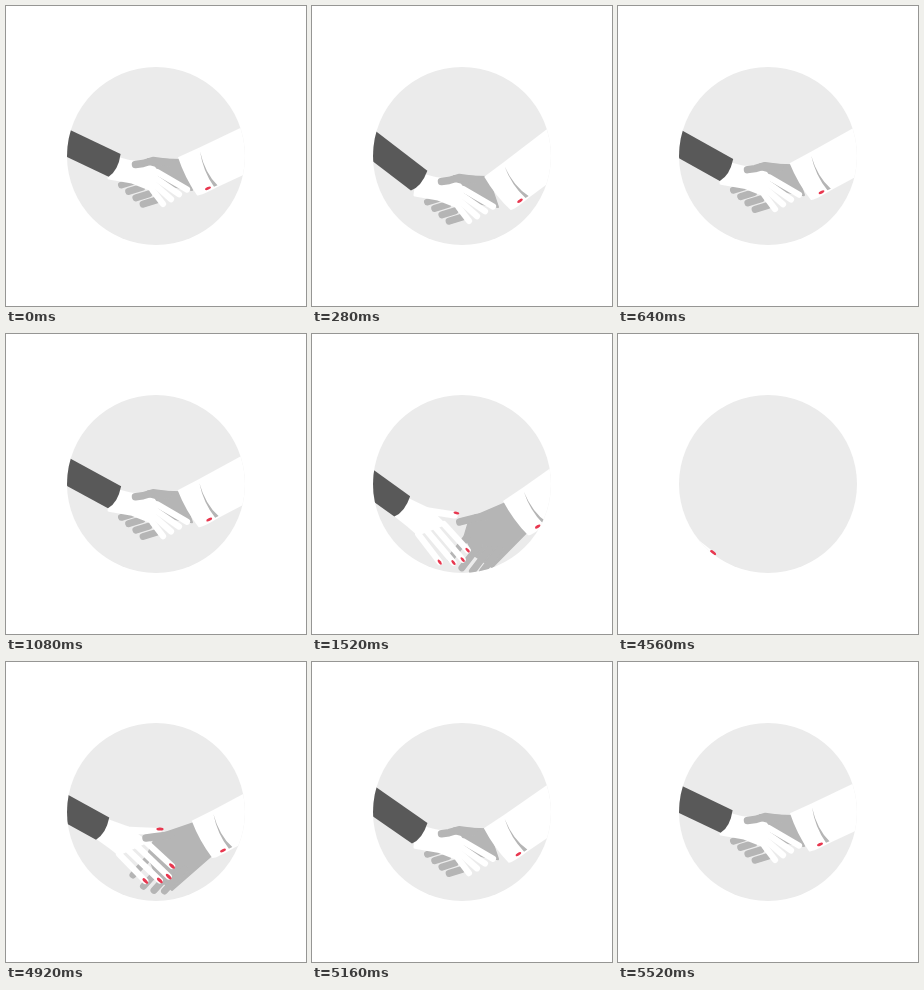
These frames come from a looping animation (300x300 px, 5.56 s). An HTML page:

```html
<!DOCTYPE html>
<html lang="en">
<head>
<meta charset="utf-8">
<title>Handshake</title>
<style>
  html, body { margin: 0; width: 100%; height: 100%; overflow: hidden; background: #fff; }
  svg { display: block; width: 100%; height: 100%; }
</style>
</head>
<body>
<svg viewBox="0 0 300 300">
  <clipPath id="disc"><circle cx="150" cy="150" r="89"/></clipPath>
  <circle cx="150" cy="150" r="89" fill="#ebebeb"/>
  <g id="scene" clip-path="url(#disc)"></g>
</svg>
<script>
const LOOP = 5560, GONE = 1960, BACK = 4560;
const WHITE = '#fff', GREY = '#b5b5b5', DARK = '#595959', RED = '#e8374f';
const LEFT = 1, RIGHT = -1;
const scene = document.getElementById('scene');
const parts = [], layers = [];

const lerp = (a, b, k) => a + (b - a) * k;
const mix = (p, q, k) => p.map((v, i) => lerp(v, q[i], k));
const clamp = v => Math.max(0, Math.min(1, v));
const smooth = u => (1 - Math.cos(Math.PI * clamp(u))) / 2;
const easeOut = u => 1 - (1 - u) ** 3;

function node(tag, attrs, parent) {
  const el = document.createElementNS('http://www.w3.org/2000/svg', tag);
  set(el, attrs);
  return parent.appendChild(el);
}

function set(el, attrs) {
  for (const name in attrs) el.setAttribute(name, attrs[name]);
}

function layer(side, isHand) {
  const g = node('g', { 'stroke-linecap': 'round', 'stroke-linejoin': 'round' }, scene);
  layers.push({ g, side, isHand });
  return g;
}

// Parts blend from a clasped pose (k = 0) to an open pose (k = 1).
function outline(g, color, clasped, open, width, filled) {
  const el = node('path', { fill: filled ? color : 'none', stroke: color, 'stroke-width': width }, g);
  parts.push(k => set(el, { d: 'M' + clasped.map((p, i) => mix(p, open[i], k)).join('L') + (filled ? 'Z' : '') }));
}

function nail(g, clasped, open) {
  const el = node('ellipse', { rx: 3.6, ry: 1.6, fill: RED }, g);
  parts.push(k => {
    const [a, b] = clasped.map((p, i) => mix(p, open[i], k));
    const turn = Math.atan2(b[1] - a[1], b[0] - a[0]) * 180 / Math.PI;
    set(el, { transform: `translate(${b}) rotate(${turn}) scale(${clamp(k * 1.6 - 0.6)})` });
  });
}

// Sleeves keep their shape; only place [x, y] and angle change.
function sleeve(side, clasped, open, angles) {
  const g = node('g', {}, layer(side, false));
  parts.push(k => set(g, {
    transform: `translate(${mix(clasped, open, k)}) rotate(${lerp(...angles, k)})`
  }));
  return g;
}

const FINGERS = [0, 1, 2, 3];

// Finger rules: base and tip for finger i
const leftClasped = i => [[151 - 1.5 * i, 166 + 6 * i], [181 - 8 * i, 183.5 + 4.8 * i]];
const leftOpen = i => [[140 - 9 * i, 180 + 4 * i], [166 - 0.5 * i - 2.8 * i * i, 204 + 15 * easeOut(i / 3)]];
const rightClasped = i => [[128.5 + 7.2 * i, 175 + 6.4 * i], [115.5 + 7.2 * i, 179 + 6.4 * i]];
const rightOpen = i => {
  const x = 127 + 10.5 * i, y = 213 + 16 * easeOut(i / 3);
  return [[x + 20, y - 22], [x, y]];
};
const knuckles = pose => FINGERS.map(i => pose(i)[0]);

// Left thumb, behind the other hand
let g = layer(LEFT, true);
const thumbIn = [[118, 158], [140, 158]], thumbOut = [[118, 168], [152, 169.5]];
outline(g, WHITE, thumbIn, thumbOut, 7);
nail(g, thumbIn, [[118, 166], [154, 167]]);

// Right hand
g = layer(RIGHT, true);
outline(g, GREY,
  [[142, 153], [176, 154], [186, 184], [165, 180], [150, 172], [142, 160]],
  [[150, 174], [188, 161], [206, 193], [166, 228], [150, 214], [142, 192]], 2, true);
for (const i of FINGERS) outline(g, GREY, rightClasped(i), rightOpen(i), 7);

// Left palm and fingers
g = layer(LEFT, true);
outline(g, WHITE,
  [[106, 151], [148, 162], ...knuckles(leftClasped), [126, 176], [103, 172]],
  [[97, 157], [122, 166], ...knuckles(leftOpen), [104, 185], [90, 175]], 3, true);
for (const i of FINGERS) {
  outline(g, WHITE, leftClasped(i), leftOpen(i), 6.2);
  nail(g, leftClasped(i), leftOpen(i));
}

// Right thumb, on top
g = layer(RIGHT, true);
outline(g, GREY,
  [[129.5, 158.5], [137, 157.5], [147, 154.5], [162, 156.5]],
  [[140, 176], [147, 175], [155, 174], [165, 173]], 7.5);

// Sleeves; the right one is drawn around its cufflink
g = sleeve(LEFT, [109, 159.8], [97, 167], [25.6, 28.8]);
node('path', { d: 'M-100-13H0Q5 3-1 12.7H-100Z', fill: DARK }, g);

g = sleeve(RIGHT, [202, 182.3], [217, 188.5], [0, -2.5]);
node('path', { d: 'M63-75L-8-41L-30-31Q-23-10-11 7Q-8 8 10-1.5L63-26Z', fill: WHITE }, g);
node('path', { d: 'M-8-37Q-3-15 9.5-3L6-1.5Q-5-17-8-37Z', fill: GREY }, g);
node('ellipse', { rx: 3.2, ry: 1.4, fill: RED, transform: 'rotate(-22)' }, g);

// Downward travel of both hands: one big shake, smaller ones, then the new grip
function dip(t) {
  const beat = 560, release = 2.5 * beat;
  if (t > GONE) return 14 * smooth((t - 4920) / 170) * (1 - smooth((t - 5090) / 450));
  if (t > release) return 10 * (1 - smooth((t - release) / 160));
  const rest = 4 * clamp(t / beat);
  return rest + (t < beat ? 15 : 6) * (1 - Math.cos(2 * Math.PI * t / beat)) / 2;
}

function swing(t) {
  const u = t < GONE ? (t - 1400) / 560 : (4920 - t) / 396;
  return 40 * clamp(u) ** 1.2;
}

function openness(t) {
  return t < GONE ? smooth((t - 1380) / 180) : 1 - smooth((t - 4920) / 250);
}

function render(t) {
  const away = t >= GONE && t < BACK;
  scene.style.display = away ? 'none' : '';
  if (away) return;
  const k = openness(t), d = dip(t), angle = swing(t);
  parts.forEach(pose => pose(k));
  for (const { g, side, isHand } of layers) {
    const shoulder = `rotate(${side * angle} ${150 - side * 106} 101)`;
    const shake = isHand ? `translate(0 ${d})` : `rotate(${side * d * 0.7} ${150 - side * 115} 160)`;
    set(g, { transform: shoulder + shake });
  }
}

const start = performance.now();
function tick() {
  render((performance.now() - start) % LOOP);
  requestAnimationFrame(tick);
}
tick();
</script>
</body>
</html>
```
